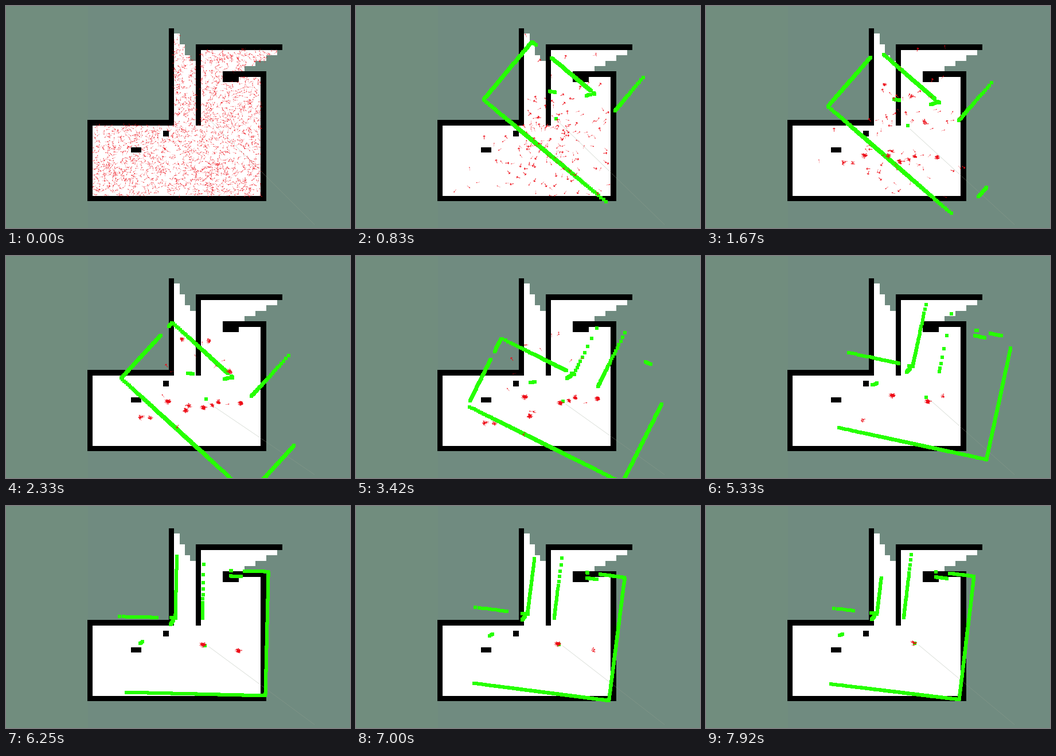
Write a matplotlib script that moves like this. It is 600 px wide and 388 px high and loops after 8 s.

```python
import numpy as np
import matplotlib.pyplot as plt
from matplotlib.animation import FuncAnimation
from matplotlib.collections import PolyCollection
from matplotlib.patches import Rectangle

W, H, DPI = 600, 388, 100
FRAMES, LOOP_MS = 96, 8000
PX = 72 / DPI
GREEN, RED = "#26ff00", "#ee0a14"

CELL, LEFT, TOP = 9.43, 142, 39      # occupancy grid on the stage
ROWS, COLS = 32, 36
RAYS, REACH = 500, 168               # laser scanner

fig = plt.figure(figsize=(W / DPI, H / DPI), dpi=DPI, facecolor="#708b80")
ax = fig.add_axes([0, 0, 1, 1])
ax.add_patch(Rectangle((0, 0), 143, H, color="#718d7e", lw=0))

# ---- map: walls as (col, row) to (col, row), shared by the scanner
WALLS = [(0, 31, 32, 31), (0, 17, 0, 31), (0, 17, 15, 17), (15, 0, 15, 17),
         (20, 3, 20, 17), (20, 3, 35, 3), (32, 8, 32, 31), (25, 8, 32, 8),
         (25, 9, 27, 9)]
BLOCKS = [(14, 19, 14, 19), (8, 22, 9, 22)]

free = np.zeros((ROWS, COLS), bool)
free[18:31, 1:32] = free[9:18, 21:32] = free[4:9, 21:25] = True
for i, top in enumerate((1, 3, 5, 6)):
    free[top:18, 16 + i] = True
for i in range(4):
    free[4 + i, 21:35 - 2 * i] = True

grid = np.zeros((ROWS, COLS, 4))
grid[free] = 1
for c0, r0, c1, r1 in WALLS + BLOCKS:
    grid[r0:r1 + 1, c0:c1 + 1] = (0, 0, 0, 1)
    free[r0:r1 + 1, c0:c1 + 1] = False
ax.imshow(grid, interpolation="nearest", aspect="auto", zorder=2,
          extent=(LEFT, LEFT + COLS * CELL, TOP + ROWS * CELL, TOP))
ax.set_xlim(0, W)
ax.set_ylim(H, 0)
ax.axis("off")


def centre(col, row):
    return LEFT + (col + 0.5) * CELL + 1j * (TOP + (row + 0.5) * CELL)


# ---- motion: points are complex numbers x + iy on the stage
PATH = np.array([(10, 272, 275), (28, 288, 257), (41, 299, 250),
                 (51, 311, 249), (75, 348, 246), (95, 367, 243)])
# error of the pose estimate: frame, dx, dy, degrees
ERROR = np.array([(1, 83, -76, 38.5), (10, 81, -72, 40), (20, 75, -50, 41),
                  (28, 64, 5, 42.7), (41, 67, 9, 26.5), (51, 77, 4, 5.8),
                  (60, 72, 4, 14), (70, 34, 2, 8), (75, 6, 0, 1.4),
                  (85, 4, 0, 8), (95, 4, 0, 6.9)])


def track(table, f):
    return [np.interp(f, table[:, 0], col) for col in table[:, 1:].T]


def path(f):
    x, y = track(PATH, f)
    return x + 1j * y


def estimate(f):
    dx, dy, deg = track(ERROR, f)
    return path(f) + dx + 1j * dy, np.exp(1j * np.radians(deg))


# ---- laser scan of the real room
ends = [(centre(a, b), centre(c, d)) for a, b, c, d in WALLS]
ends += [(280 + 216j, 285 + 208j), (226 + 251j, 234 + 246j)]
SEG_A, SEG_B = np.array(ends).T
BEAMS = np.exp(2j * np.pi * np.arange(RAYS) / RAYS)[:, None]


def cross(a, b):
    return (a.conjugate() * b).imag


def scan(f):
    """Beam end points, placed on the stage by the estimated pose."""
    eye = path(f) + 7j
    along, to_a = SEG_B - SEG_A, SEG_A - eye
    det = cross(BEAMS, along)
    det = np.where(abs(det) < 1e-9, 1e-9, det)
    dist = cross(to_a, along) / det
    part = cross(to_a, BEAMS) / det
    hit = (dist > 0) & (part > -0.01) & (part < 1.01)
    dist = np.where(hit, dist, np.inf).min(axis=1)
    seen = dist < REACH
    pos, turn = estimate(f)
    points = pos + (dist[seen] * BEAMS[seen, 0]) * turn
    return np.append(points, pos - (7 + 2j) * turn)


# ---- particles
rng = np.random.default_rng(12)
rows, cols = np.nonzero(free)
cells = centre(cols, rows)


def sample(n, weight):
    pick = rng.choice(len(cells), n, p=weight / weight.sum())
    jitter = rng.uniform(-0.6, 0.6, (2, n)) * CELL
    return cells[pick] + jitter[0] + 1j * jitter[1]


def spin(n, spread):
    return np.exp(1j * rng.normal(0, spread, n))


cloud = sample(1900, np.ones(len(cells)))
cloud_dir = spin(len(cloud), 9)

HUB = 335 + 235j
spread = sample(190, np.exp(-abs(cells - HUB) ** 2 / (2 * 45 ** 2)) + 0.12)
spread_dir = np.exp(1j * np.angle(spread - HUB)) * spin(len(spread), 0.9)
spread_w = rng.choice([0.7, 1.0, 2.2], len(spread))

# guesses about the pose: x, y, degrees, size, last frame
GUESSES = [(345, 264, 0, 36, 86), (283, 253, 0, 36, 99), (372, 255, 0, 26, 66),
           (360, 260, 0, 12, 60), (410, 256, 0, 30, 62), (313, 271, 170, 24, 66),
           (235, 283, 170, 16, 54), (252, 284, 170, 10, 52),
           (318, 262, 170, 14, 45), (307, 147, 170, 14, 42),
           (353, 147, -60, 14, 43), (392, 201, 40, 18, 40)]
swarms = [(x + 1j * y, np.exp(1j * np.radians(deg)), n, last,
           rng.normal(0, 1.5, n) + 1j * rng.normal(0, 1.4, n), spin(n, 0.4))
          for x, y, deg, n, last in GUESSES]

# arrow of length 1 along x, unit width
SHAFT_X = np.array([0, 0.7, 0.7, 1, 0.7, 0.7, 0])
SHAFT_Y = np.array([-0.2, -0.2, -1.2, 0, 1.2, 0.2, 0.2])


def arrows(pos, heading, length, width):
    width = np.broadcast_to(width, len(pos))[:, None]
    outline = (SHAFT_X - 0.5) * length + 1j * SHAFT_Y * width
    z = pos[:, None] + outline * heading[:, None]
    return list(np.stack([z.real, z.imag], -1))


def particles(f):
    n = int(len(cloud) * np.exp(-f / 3)) if f < 9 else 0
    out = arrows(cloud[:n], cloud_dir[:n], 6.5, 0.65)
    if f > 0:
        n = int(len(spread) * np.clip((27 - f) / 17, 0, 1))
        n = max(n, 9 if f < 46 else 0)
        ahead = spread_dir[:n] * abs(path(f) - path(10))
        out += arrows(spread[:n] + ahead, spread_dir[:n], 7, spread_w[:n])
    for start, turn, size, last, offs, dirs in swarms:
        if 14 <= f < last:
            share = min(1, (f - 13) / 12, (last - f) / 12)
            n = max(2, int(size * share))
            pos = start + (path(f) - path(28)) * turn
            out += arrows(pos + offs[:n], turn * dirs[:n], 5, 1.3)
    return out


# ---- drawing
LINK_END = (538, 382)
link, = ax.plot([], [], color="#98a493", alpha=0.5, lw=0.6 * PX, zorder=3)
dots, = ax.plot([], [], "s", color=GREEN, ms=6.8 * PX, mew=0, zorder=4)
poses = PolyCollection([], facecolors=RED, edgecolors="none", zorder=5)
ax.add_collection(poses, autolim=False)


def update(f):
    pos, _ = estimate(f)
    link.set_data([pos.real, LINK_END[0]], [pos.imag, LINK_END[1]])
    points = scan(f) if f > 0 else np.array([], complex)
    dots.set_data(points.real, points.imag)
    poses.set_verts(particles(f))
    return link, dots, poses


anim = FuncAnimation(fig, update, frames=FRAMES, interval=LOOP_MS / FRAMES,
                     init_func=lambda: update(0), repeat=True, repeat_delay=0)
plt.show()
```
